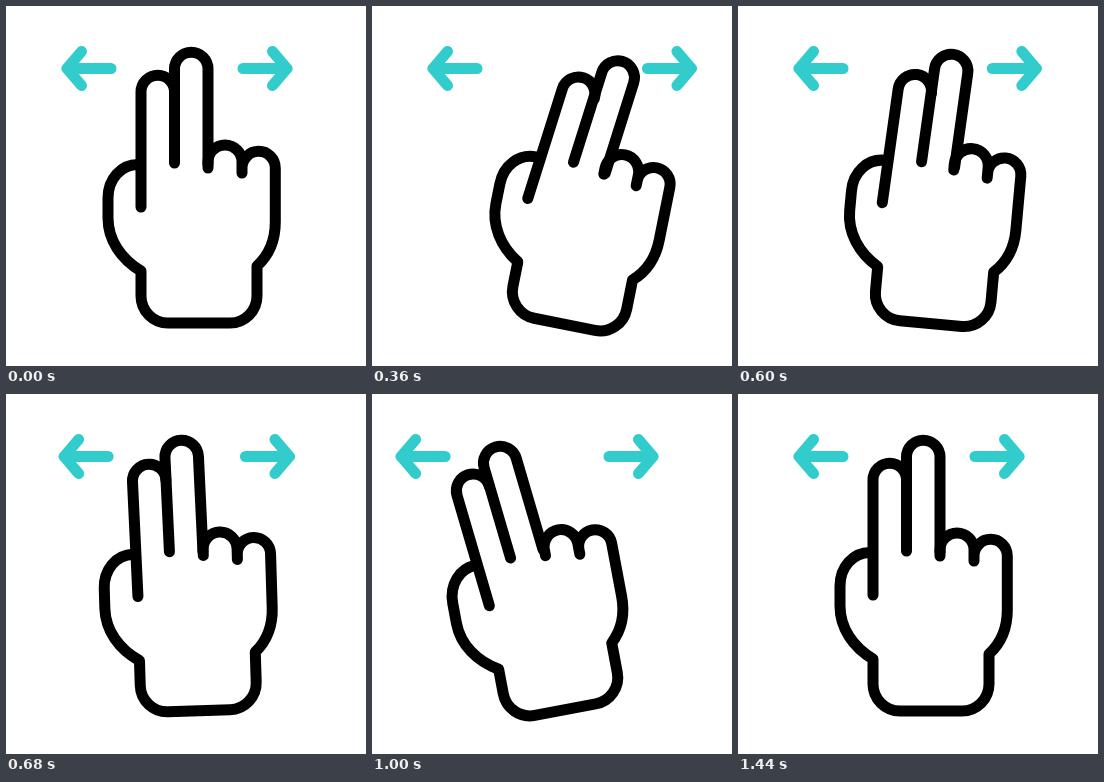
Write an HTML page with a canvas that moves like this. It is 360 px wide and 360 px high and loops after 1480 ms.

```html
<!DOCTYPE html>
<html lang="en">
<head>
<meta charset="utf-8">
<title>Two finger swipe</title>
<style>
  html, body { margin: 0; width: 100%; height: 100%; overflow: hidden; background: #fff; }
  canvas { display: block; width: 360px; height: 360px; }
</style>
</head>
<body>
<canvas id="stage"></canvas>
<script>
const SIZE = 360, LOOP = 1480, STEP = 40;
const WRIST = [186, 315];
const canvas = document.getElementById('stage');
const ctx = canvas.getContext('2d');
const scale = window.devicePixelRatio || 1;
canvas.width = canvas.height = SIZE * scale;

const palm = new Path2D(`
  M132 158.5 C115 158.5 102 173 102 192 V212 C102 234 115 253 135 265
  V290 A27 27 0 0 0 162 317 H224 A27 27 0 0 0 251 290 V260
  C262 250 269.3 236 269.3 216 V162 A16.65 16.65 0 0 0 236 162 V167
  V156 A17 17 0 0 0 202 156 V162`);
const fingers = [
  { knuckle: [135, 175], path: new Path2D('M135 201 V86 A16.75 16.75 0 0 1 168.5 86') },
  { knuckle: [176, 170], path: new Path2D('M168.5 157 V63 A16.75 16.75 0 0 1 202 63 V158') },
];
const leftArrow = new Path2D('M75.5 45.5 L61 62.5 L75.5 79.5 M61 62.5 H105');
const rightArrow = new Path2D('M266.5 45.5 L281 62.5 L266.5 79.5 M281 62.5 H237');

// Eased value through [step, value] keys, held outside their range.
function keyed(keys, step) {
  if (step <= keys[0][0]) return keys[0][1];
  for (let i = 1; i < keys.length; i++) {
    const [start, from] = keys[i - 1], [end, to] = keys[i];
    if (step <= end) {
      const u = (step - start) / (end - start);
      return from + (to - from) * u * u * (3 - 2 * u);
    }
  }
  return keys[keys.length - 1][1];
}

function rotateAbout([x, y], degrees) {
  ctx.translate(x, y);
  ctx.rotate(degrees * Math.PI / 180);
  ctx.translate(-x, -y);
}

function drawArrow(path, dx) {
  ctx.save();
  ctx.translate(dx, 0);
  ctx.strokeStyle = '#33cccc';
  ctx.stroke(path);
  ctx.restore();
}

function drawHand(swing) {
  ctx.save();
  ctx.strokeStyle = '#000';
  rotateAbout(WRIST, 13 * swing);
  ctx.stroke(palm);
  for (const { knuckle, path } of fingers) {
    ctx.save();
    rotateAbout(knuckle, 7 * swing);
    ctx.stroke(path);
    ctx.restore();
  }
  ctx.restore();
}

function render(now) {
  const step = Math.floor((now % LOOP) / STEP);
  ctx.setTransform(scale, 0, 0, scale, 0, 0);
  ctx.fillStyle = '#fff';
  ctx.fillRect(0, 0, SIZE, SIZE);
  ctx.lineWidth = 11;
  ctx.lineCap = ctx.lineJoin = 'round';
  drawArrow(leftArrow, keyed([[16, 0], [22, -39], [33, 0]], step));
  drawArrow(rightArrow, keyed([[2, 0], [11, 44], [18, 0]], step));
  drawHand(keyed([[2, 0], [11, 1], [22, -1], [33, 0]], step));
}

let origin;
function tick(now) {
  origin ??= now;
  render(now - origin);
  requestAnimationFrame(tick);
}
render(0);
requestAnimationFrame(tick);
</script>
</body>
</html>
```
